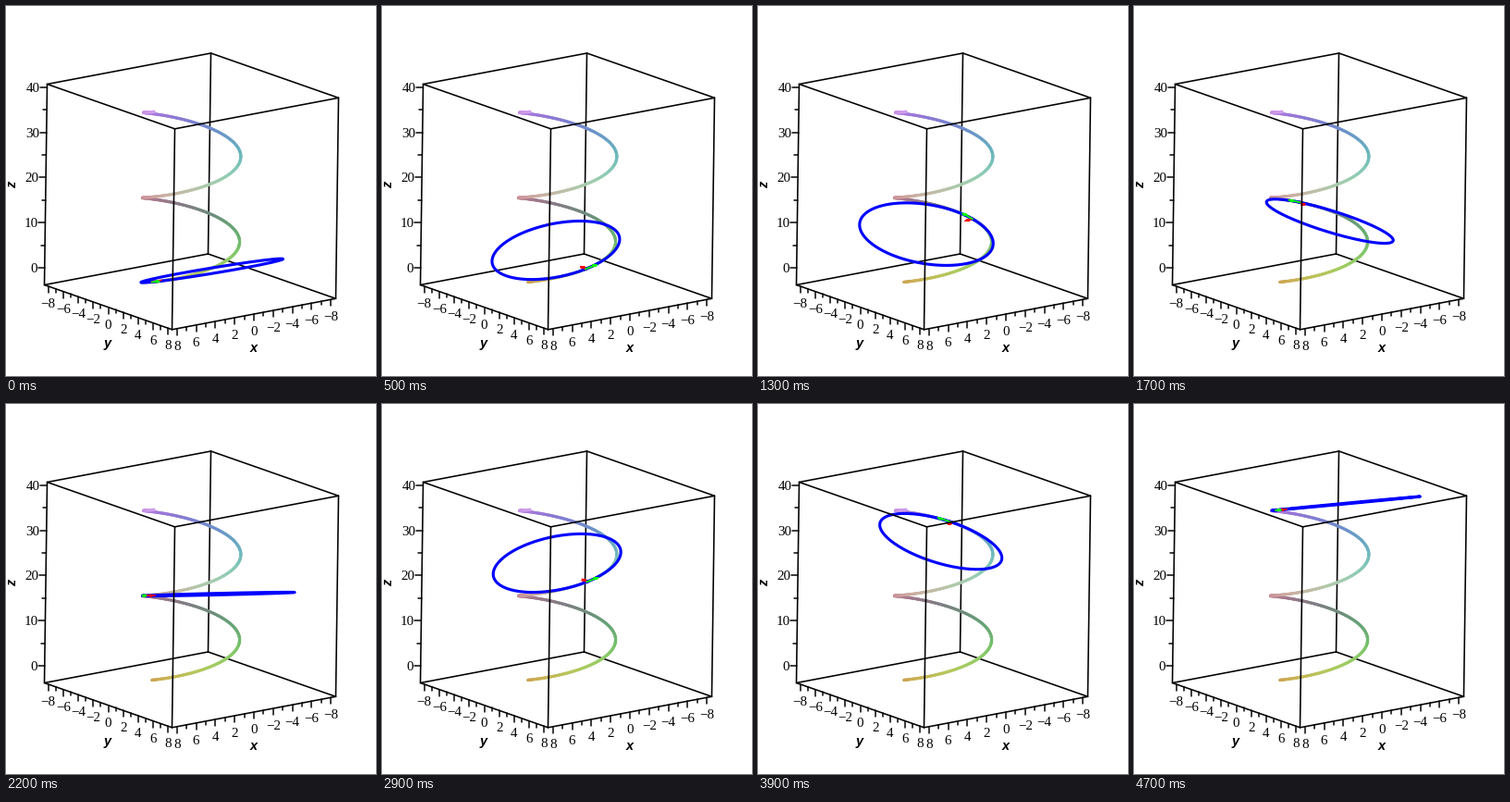
A matplotlib script for the animation above (4.8 s loop, 400 by 400 pixels).

```python
import numpy as np
import matplotlib.pyplot as plt
from matplotlib.animation import FuncAnimation
from matplotlib.collections import LineCollection, PolyCollection

FRAMES, INTERVAL = 48, 100
TURN = 4 * np.pi
A, B = 4, 3                       # helix radius and rise per radian
RHO = (A * A + B * B) / A         # radius of curvature
LIM = 8.5
Z0 = -0.6 * RHO
Z1 = B * TURN * (FRAMES - 1) / FRAMES + 0.6 * RHO

# Affine view: pixel position of the box floor centre and unit steps
ORIGIN = np.array([198.5, 308.4])
AXES = np.array([[-177 / 17, 33.5 / 17],
                 [138 / 17, 48.3 / 17],
                 [3 / (Z1 - Z0), -217 / (Z1 - Z0)]])


def project(p):
    return ORIGIN + (np.asarray(p, float) - [0, 0, Z0]) @ AXES


def helix(t):
    return np.stack([A * np.cos(t), A * np.sin(t), B * t], axis=-1)


def frenet(t):
    c, s = np.cos(t), np.sin(t)
    tangent = np.array([-A * s, A * c, B]) / np.hypot(A, B)
    normal = np.array([-c, -s, 0])
    return tangent, normal, np.cross(tangent, normal)


fig = plt.figure(figsize=(4, 4), dpi=100, facecolor="white")
ax = fig.add_axes([0, 0, 1, 1])
ax.set_xlim(-0.5, 399.5)
ax.set_ylim(399.5, -0.5)
ax.axis("off")


def px(n):
    return n * 0.72


def line(p, q, width=1.6, z=4):
    ax.plot([p[0], q[0]], [p[1], q[1]], color="black", lw=px(width),
            solid_capstyle="round", zorder=z)


def label(x, y, s, **kw):
    style = dict(family="Liberation Serif", size=px(15), ha="center",
                 va="center_baseline", color="black", zorder=5)
    ax.text(x, y, s, **{**style, **kw})


def draw_box():
    corners = [(x, y, z) for x in (-LIM, LIM) for y in (-LIM, LIM)
               for z in (Z0, Z1)]
    for i, p in enumerate(corners):
        for q in corners[i + 1:]:
            if sum(a != b for a, b in zip(p, q)) == 1:
                behind = (-LIM, -LIM, Z0) in (p, q)
                line(project(p), project(q), z=0 if behind else 4)


def draw_ticks():
    for v in range(-8, 9):
        major = v % 2 == 0
        for point in ((v, LIM, Z0), (LIM, v, Z0)):
            x, y = project(point)
            line((x, y), (x, y + (7 if major else 4)), 1.5)
            if major:
                label(x, y + 18, str(v).replace("-", "\u2212"))
    for v in range(0, 41, 5):
        x, y = project((LIM, -LIM, v))
        major = v % 10 == 0
        line((x - (7 if major else 4), y), (x, y), 1.5)
        if major:
            label(x - 7.5, y, str(v), ha="right")
    title = dict(family="Liberation Sans", weight="bold", style="italic",
                 size=px(14.5), va="center")
    label(267, 370, "x", **title)
    label(109, 364, "y", **title)
    label(7, 193, "z", rotation=90, **title)


def draw_helix():
    t = np.linspace(0, TURN, 401)
    pts = project(helix(t))
    m = (t[:-1] + t[1:]) / 2
    rgb = np.stack([105 + 50 * (np.cos(m) + 1),
                    120 + 42 * (np.sin(m) + 1),
                    80 + 155 * m / TURN], axis=-1) / 255
    ax.add_collection(LineCollection(
        np.stack([pts[:-1], pts[1:]], axis=1), colors=rgb,
        linewidths=px(3.2), capstyle="round", zorder=1))


class Arrow:
    """Shaft with a cone head."""

    def __init__(self, color, length, z):
        self.length = length
        self.shaft, = ax.plot([], [], color=color, lw=px(1.8), zorder=z)
        self.head = PolyCollection([], facecolors=color, edgecolors=color,
                                   linewidths=px(0.4), zorder=z)
        ax.add_collection(self.head)

    def place(self, start, axis, u, v):
        tip = start + self.length * axis
        base = tip - 0.4 * axis
        a = np.linspace(0, 2 * np.pi, 13)[:, None]
        ring = project(base + 0.2 * (np.cos(a) * u + np.sin(a) * v))
        top = project(tip)
        self.shaft.set_data(*project([start, base]).T)
        self.head.set_verts([ring] + [np.array([top, p, q])
                                      for p, q in zip(ring, ring[1:])])


draw_box()
draw_ticks()
draw_helix()
circle, = ax.plot([], [], color=(0, 0, 1), lw=px(3.1), zorder=2,
                  solid_joinstyle="round")
normal_arrow = Arrow((1, 0, 0), 1.0, 3)
tangent_arrow = Arrow((0, 1, 0), 1.3, 3.5)
ANGLE = np.linspace(0, 2 * np.pi, 181)[:, None]


def update(i):
    t = TURN * i / FRAMES
    p = helix(t)
    tan, nor, bi = frenet(t)
    ring = p + RHO * (nor * (1 - np.cos(ANGLE)) + tan * np.sin(ANGLE))
    circle.set_data(*project(ring).T)
    normal_arrow.place(p, nor, tan, bi)
    tangent_arrow.place(p, tan, nor, bi)
    return (circle, normal_arrow.shaft, normal_arrow.head,
            tangent_arrow.shaft, tangent_arrow.head)


anim = FuncAnimation(fig, update, frames=FRAMES, interval=INTERVAL,
                     repeat=True, repeat_delay=0, blit=False)
plt.show()
```
